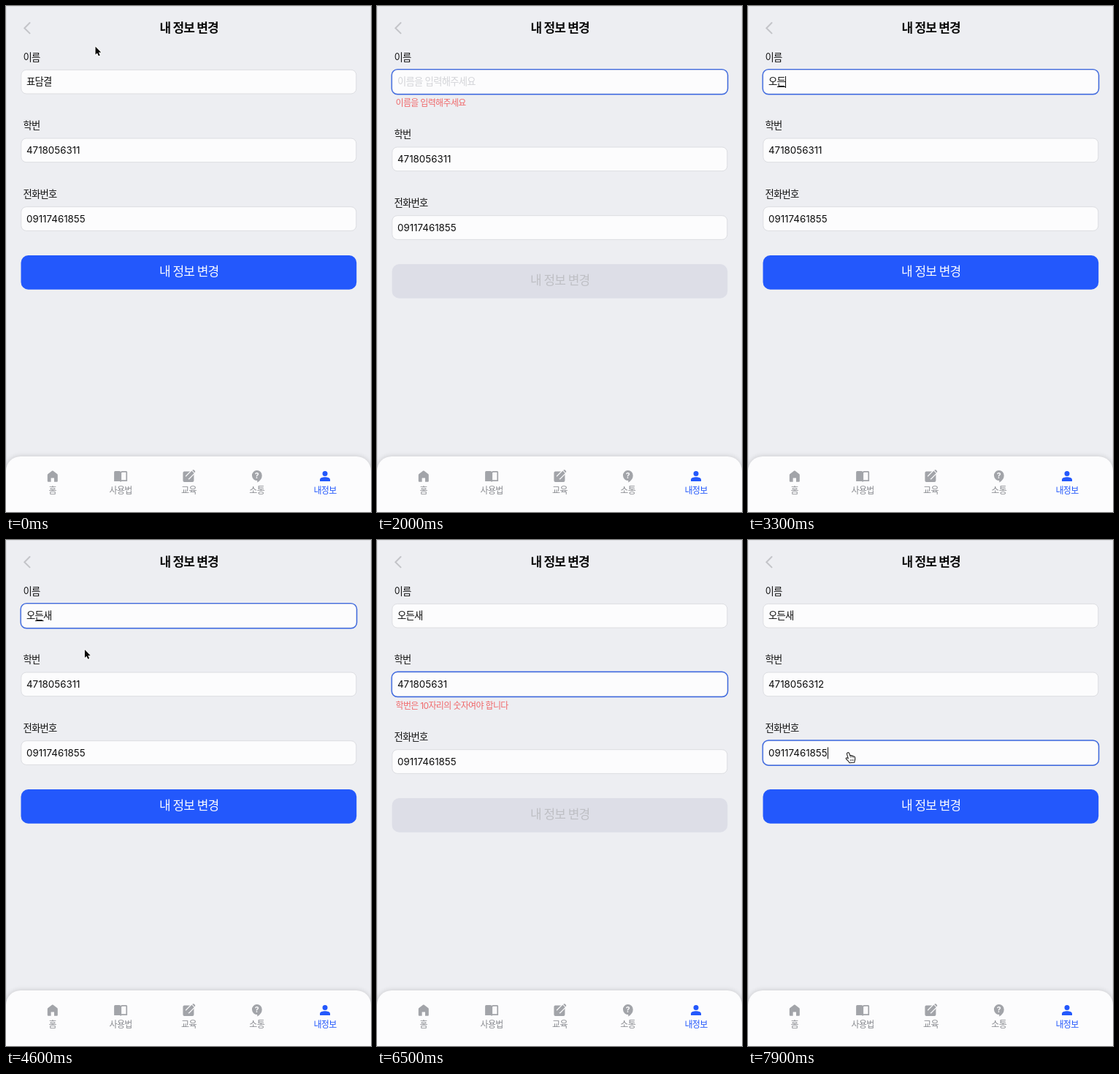
Animation, 500 px wide and 692 px high, one loop 8000 ms. Source, as an HTML page with a canvas:

```html
<!DOCTYPE html>
<html lang="ko">
<head>
<meta charset="utf-8">
<style>
html, body { margin: 0; width: 100%; height: 100%; overflow: hidden; background: #edeef2; }
canvas { display: block; }
</style>
</head>
<body>
<canvas id="stage" width="500" height="692"></canvas>
<script>
const ctx = document.getElementById('stage').getContext('2d');
const LOOP = 8000, FADE = 200;
const BLUE = '#2358fc', PAPER = '#fcfcfd', GREY = '#a2a4a9';

// Timelines: [start ms, value]
const names = [[0, '표담결'], [1300, '표담'], [1400, '표'], [1500, ''], [2500, 'ㅇ'], [2700, '오'],
  [2900, '옫'], [3000, '오드'], [3200, '오든'], [3600, '오든ㅅ'], [3800, '오든새']];
const numbers = [[0, '4718056311'], [6000, '471805631'], [6600, '4718056312']];
const phones = [[0, '09117461855']];
const focus = [[0, -1], [500, 0], [5000, 1], [7500, 2]];
const edits = [...names, ...numbers, ...focus].map(e => e[0]);
const errors = [
  { field: 0, from: 1500, to: 2500, text: '이름을 입력해주세요' },
  { field: 1, from: 6000, to: 6600, text: '학번은 10자리의 숫자여야 합니다' }
];
const fields = [['이름', names], ['학번', numbers], ['전화번호', phones]];
// Pointer moves: [start, end, x, y]
const moves = [[100, 300, 86.5, 100.7], [4400, 4800, 129, 198.7], [7000, 7300, 136.5, 290.7]];

const valueAt = (line, t) => line.filter(e => e[0] <= t).pop()[1];
const clamp = v => Math.max(0, Math.min(1, v));
const ease = v => v * v * (3 - 2 * v);
const pulse = (t, from, to) => clamp((t - from) / FADE) - clamp((t - to) / FADE);

function text(str, x, y, size, color, weight = 400, align = 'left') {
  ctx.font = `${weight} ${size}px Inter, "Noto Sans CJK KR", "Noto Sans CJK", sans-serif`;
  ctx.letterSpacing = /[ㄱ-힣]/.test(str) ? `${-0.055 * size}px` : '0px';
  ctx.textAlign = align;
  ctx.fillStyle = color;
  ctx.fillText(str, x, y);
  return ctx.measureText(str).width;
}

function box(x, y, w, h, r, fill, stroke, line = 1) {
  ctx.beginPath();
  ctx.roundRect(x, y, w, h, r);
  if (fill) { ctx.fillStyle = fill; ctx.fill(); }
  if (stroke) { ctx.strokeStyle = stroke; ctx.lineWidth = line; ctx.stroke(); }
}

function shape(d, fill, stroke, line = 1) {
  const path = new Path2D(d);
  if (fill) { ctx.fillStyle = fill; ctx.fill(path, 'evenodd'); }
  if (stroke) { ctx.strokeStyle = stroke; ctx.lineWidth = line; ctx.stroke(path); }
}

function at(x, y, draw) {
  ctx.save();
  ctx.translate(x, y);
  draw();
  ctx.restore();
}

const tabs = [
  ['홈', () => shape('M-7-1.5Q-7-2.4-6.3-2.9L-.8-7.2Q0-7.8.8-7.2L6.3-2.9Q7-2.4 7-1.5V6.8Q7 7.8 6 7.8H2.2V2.6H-2.2V7.8H-6Q-7 7.8-7 6.8Z', GREY)],
  ['사용법', () => shape('M-9-5.5Q-9-7-7.5-7H-2Q-.5-7 0-6Q.5-7 2-7H7.5Q9-7 9-5.5V7H1L0 8L-1 7H-9ZM1-4.3Q1.2-5.3 2.2-5.3H7.3V5.2H1Z', GREY)],
  ['교육', () => {
    box(-8, -6.5, 15, 14.5, 2, GREY);
    shape('M-2.2 2.2L9-9', null, PAPER, 7);
    shape('M-3.5 3.5V.2L4-7.3L7.3-4L-.2 3.5ZM4.8-8L5.6-8.6Q6.4-9.1 7.2-8.4L8.4-7.2Q9.1-6.4 8.6-5.6L8-4.8Z', GREY);
  }],
  ['소통', () => {
    shape('M0-8A7 7 0 0 1 7-1Q7 5 .5 8.5V6A7 7 0 0 1 0-8Z', GREY);
    text('?', 0, 2.8, 10.5, PAPER, 700, 'center');
  }],
  ['내정보', () => shape('M0-7A3.5 3.5 0 0 1 0 0A3.5 3.5 0 0 1 0-7ZM-7 7V4.8C-7 2-3 1.2 0 1.2S7 2 7 4.8V7Z', BLUE)]
];

function drawNav() {
  ctx.save();
  ctx.shadowColor = 'rgba(0,0,0,.17)';
  ctx.shadowBlur = 7;
  box(0, 616, 500, 100, 20, PAPER);
  ctx.restore();
  tabs.forEach(([label, icon], i) => {
    const x = 63.8 + i * 93.3;
    at(x, 643, icon);
    text(label, x, 666.8, 12, i === 4 ? BLUE : '#898b90', 400, 'center');
  });
}

function drawField(i, y, t) {
  const [label, line] = fields[i];
  const value = valueAt(line, t), active = valueAt(focus, t) === i;
  const start = focus[i + 1][0], end = i < 2 ? focus[i + 2][0] : LOOP;
  const glow = pulse(t, start, end);
  text(label, 23.5, y - 12.4, 13.3, '#111', 500);
  box(20.8, y + .3, 459, 32.7, 7, PAPER, '#dcdde1');
  ctx.globalAlpha = glow;
  box(20.1, y - .4, 460.5, 34.2, 8, null, '#3d69e2', 1.4);
  ctx.globalAlpha = 1;
  const width = value
    ? text(value, 28, y + 21.3, 13.33, '#0c0c0c')
    : (text('이름을 입력해주세요', 28, y + 21.3, 13.33, '#d3d4d8'), 0);
  if (!active) return;
  ctx.fillStyle = '#111';
  if (i === 0 && t >= 2500) ctx.fillRect(40 - 12 * (2 - Math.min(2, value.length)), y + 23, 11.5, 1);
  const lastEdit = Math.max(...edits.filter(e => e <= t));
  if ((t - lastEdit) % 1000 < 500) ctx.fillRect(Math.round(28 + width), y + 9, 1, 16);
}

function drawPointer(t) {
  if ((t >= 1300 && t < 4400) || (t >= 6000 && t < 7000)) return;
  let x = 122.5, y = 55.5;
  for (const [from, to, endX, endY] of moves) {
    const k = ease(clamp((t - from) / (to - from)));
    x += (endX - x) * k;
    y += (endY - y) * k;
  }
  const overField = fields.some((f, i) => y > 87 + i * 93.7 && y < 120 + i * 93.7);
  at(x, y, () => {
    ctx.lineJoin = 'round';
    if (overField) {
      ctx.translate(4, 6.8);
      shape('M-4.2-6.5C-3.2-7.3-2.2-6.8-1.8-5.8L-.6-2.4C.3-3.2 1.4-2.9 1.8-2C2.7-2.7 3.7-2.3 4-1.4C5-1.8 5.9-1.2 6.1 0C6.6 2.5 5.6 4.2 5.2 6.8L-1.6 7.2C-2 5.6-5 3.4-6.2 1.6C-6.6.6-5.4-.1-4.4.6L-3.2 1.4L-5-4.6C-5.3-5.6-5-6.2-4.2-6.5Z', '#fff', '#222', 1.1);
      shape('M-.6-2.4L.2 .2M1.8-2L2.3 .2M4-1.4L4.2 .4M-.3 2.4L.1 5M1.7 2.3L1.9 4.9M3.6 2.2V4.8', null, '#444', .8);
    } else {
      const arrow = 'M0 0V11L2.5 8.7L4.3 12.8L6.2 12L4.4 8H7.8Z';
      shape(arrow, null, '#fff', 1.8);
      shape(arrow, '#080808');
    }
  });
}

function draw(t) {
  ctx.fillStyle = '#edeef2';
  ctx.fillRect(0, 0, 500, 692);
  box(.5, .5, 499, 720, 0, null, '#dfe0e4');
  ctx.lineCap = 'round';
  shape('M32.5 23L25.3 30.2L32.5 37.4', null, '#c3c4c8', 2);
  ctx.lineCap = 'butt';
  text('내 정보 변경', 250.5, 36, 17, '#0c0c0c', 600, 'center');

  let shift = 0, disabled = 0;
  fields.forEach((f, i) => {
    const y = 87 + i * 93.7 + shift;
    drawField(i, y, t);
    for (const e of errors) {
      if (e.field !== i) continue;
      disabled += pulse(t, e.from, e.to);
      if (t >= e.from && t < e.to) {
        text(e.text, 25.5, y + 50, 12, '#f0696b');
        shift = 12;
      }
    }
  });

  const y = 341 + shift;
  const mix = (a, b) => `rgb(${a.map((v, i) => v + (b[i] - v) * disabled).join()})`;
  box(20.5, y, 459.7, 46.7, 10, mix([35, 88, 252], [221, 222, 231]));
  text('내 정보 변경', 250.5, y + 28.4, 17, mix([250, 251, 255], [190, 191, 196]), 400, 'center');
  drawNav();
  drawPointer(t);
}

function tick() {
  draw(performance.now() % LOOP);
  requestAnimationFrame(tick);
}
tick();
</script>
</body>
</html>
```
